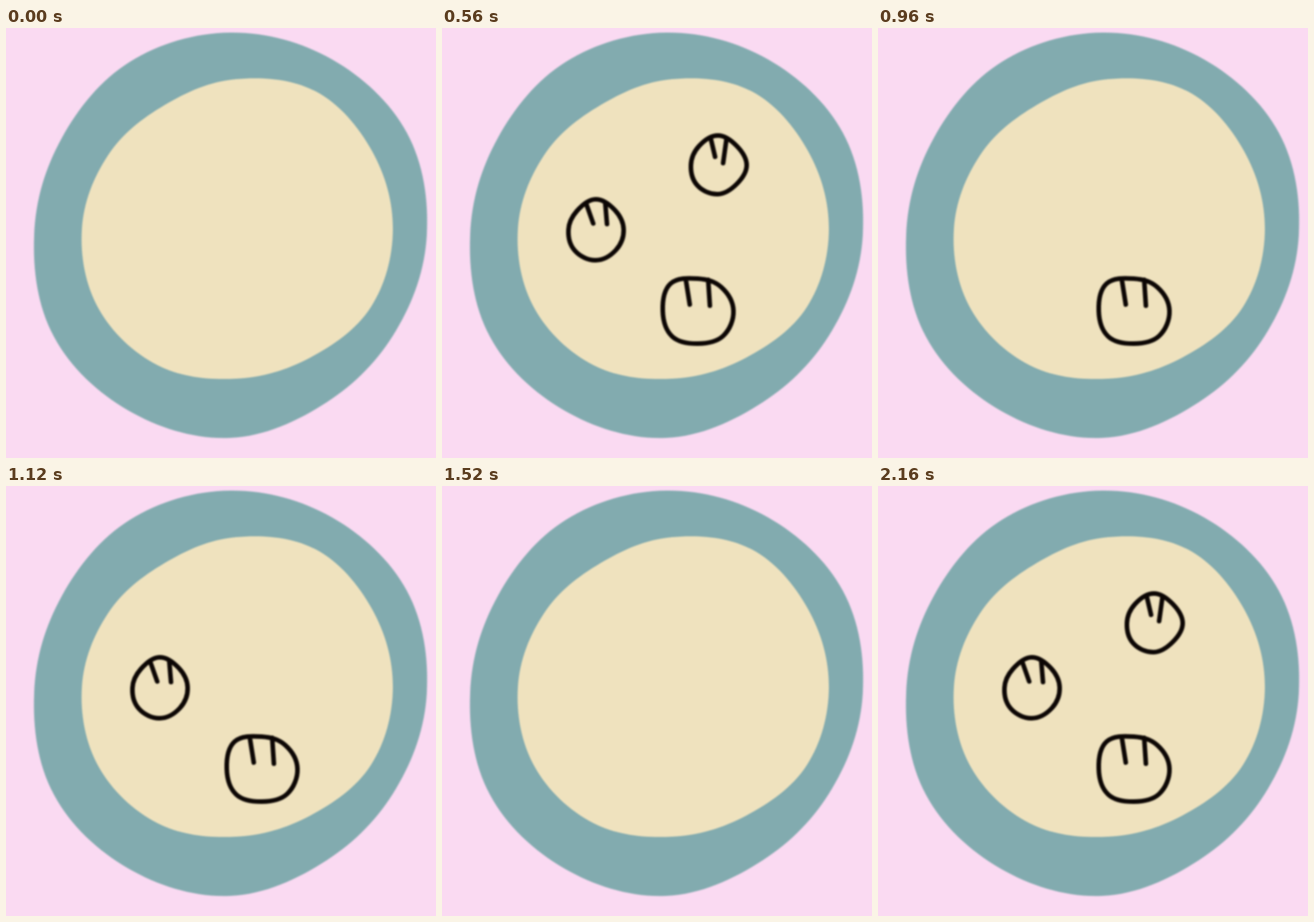
Write an HTML page with a canvas that moves like this. It is 748 px wide and 748 px high and loops after 2400 ms.

```html
<!DOCTYPE html>
<html lang="en">
<head>
<meta charset="utf-8">
<title>Buns on a plate</title>
<style>
  html, body { margin: 0; width: 100%; height: 100%; overflow: hidden; background: #fadaf2; }
  canvas { display: block; width: 100%; height: 100%; }
</style>
</head>
<body>
<canvas id="stage" width="748" height="748"></canvas>
<script>
const ctx = document.getElementById('stage').getContext('2d');
const LOOP = 2400;
const TICK = 80;
const STEP = 200;
const LAST = LOOP / STEP - 1;

// Wobbly circle: radii at equal angles, clockwise from the right, joined smoothly.
function blob(cx, cy, ...radii) {
  const n = radii.length;
  const at = i => {
    const a = i / n * 2 * Math.PI;
    const r = radii[(i + n) % n];
    return [cx + r * Math.cos(a), cy + r * Math.sin(a)];
  };
  const path = new Path2D();
  // Tangent length for which equal radii give a true circle.
  const k = 2 / 3 * Math.tan(Math.PI / 2 / n) / Math.sin(2 * Math.PI / n);
  path.moveTo(...at(0));
  for (let i = 0; i < n; i++) {
    const [a, b, c, d] = [at(i - 1), at(i), at(i + 1), at(i + 2)];
    path.bezierCurveTo(
      b[0] + (c[0] - a[0]) * k, b[1] + (c[1] - a[1]) * k,
      c[0] - (d[0] - b[0]) * k, c[1] - (d[1] - b[1]) * k,
      c[0], c[1]
    );
  }
  path.closePath();
  return path;
}

// Adds a slit that starts at x, y and runs down by dx, dy.
function slit(path, x, y, dx, dy) {
  path.moveTo(x, y);
  path.lineTo(x + dx, y + dy);
}

const rim = blob(390, 360, 342, 333, 336, 353, 353, 354, 341, 338, 348, 352, 353, 355);
const plate = blob(400, 350, 273, 271, 258, 260, 273, 276, 268, 257, 249, 261, 277, 273);

const low = blob(445, 492, 62, 62, 57, 63, 61, 67, 56, 58);
slit(low, 424, 437, 7, 44);
slit(low, 463, 438, 3, 45);

const left = blob(267, 351, 49, 50, 53, 51, 47, 46, 53, 48);
slit(left, 251, 306, 12, 34);
slit(left, 284, 305, 3, 36);

const high = blob(480, 239, 50, 46, 50, 50, 47, 47, 52, 47);
slit(high, 467, 190, 8, 34);
slit(high, 495, 192, -6, 43);

const buns = [low, left, high];

function draw(count) {
  ctx.filter = 'none';
  ctx.fillStyle = '#fadaf2';
  ctx.fillRect(0, 0, 748, 748);
  ctx.filter = 'blur(1.4px)';
  ctx.fillStyle = '#82abaf';
  ctx.fill(rim);
  ctx.fillStyle = '#efe2be';
  ctx.fill(plate);
  ctx.strokeStyle = '#0c0604';
  ctx.lineWidth = 8;
  ctx.lineCap = ctx.lineJoin = 'round';
  for (const bun of buns.slice(0, count)) ctx.stroke(bun);
}

// Steps of 200 ms, snapped to 80 ms ticks; the last one holds until the loop ends.
function bunCount(t) {
  const tick = Math.floor(t / TICK) + 1;
  return Math.min(LAST, Math.floor(tick * TICK / STEP)) % 4;
}

const start = performance.now();
let shown = -1;

function frame() {
  const count = bunCount((performance.now() - start) % LOOP);
  if (count !== shown) draw(shown = count);
  requestAnimationFrame(frame);
}
frame();
</script>
</body>
</html>
```
